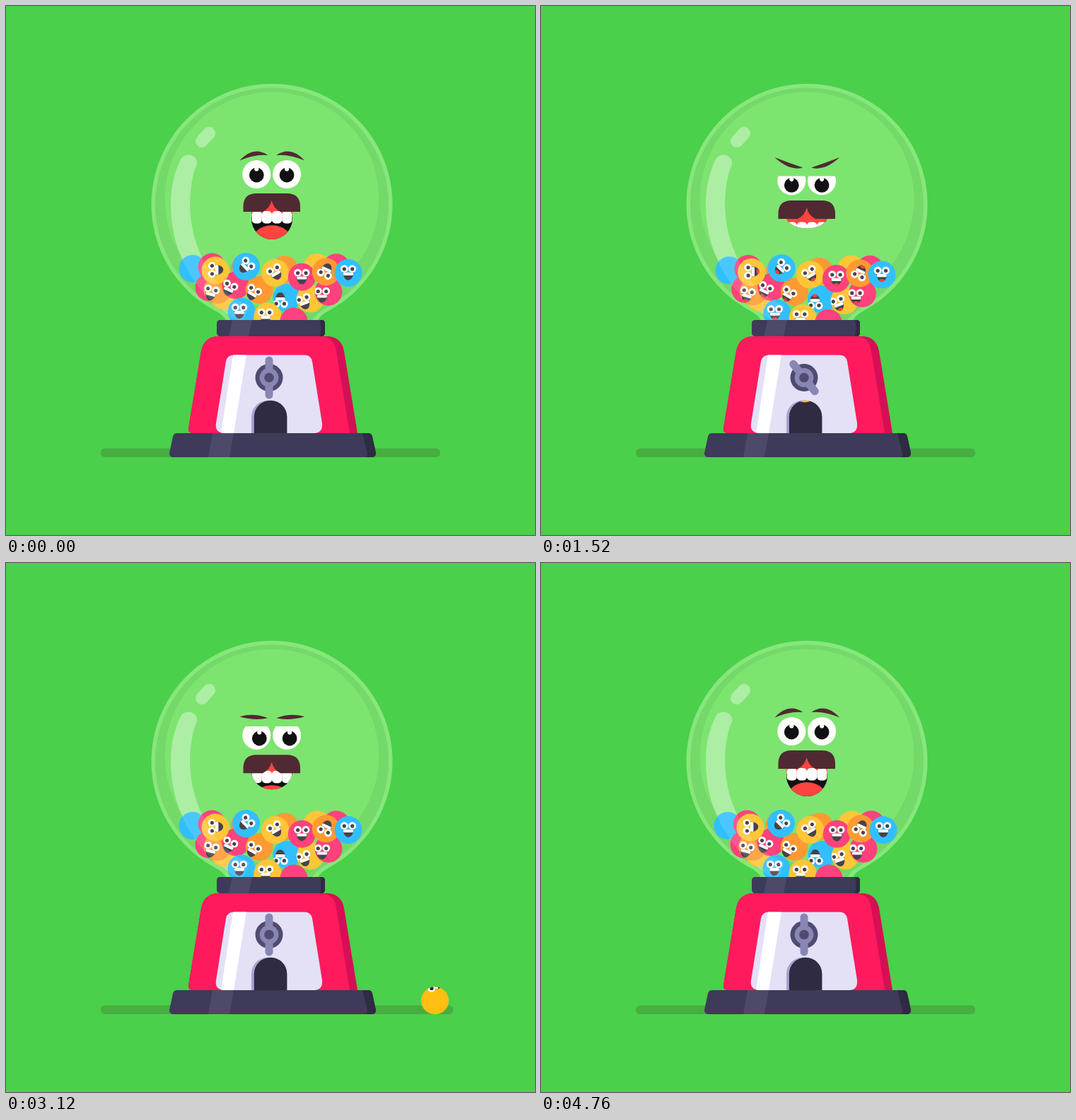
Animation, 748 px wide and 748 px high, one loop 4.8 s. Source, as an HTML page with a canvas:

```html
<!DOCTYPE html>
<html lang="en">
<head>
<meta charset="utf-8">
<title>Gumball machine</title>
<style>
  html, body { margin: 0; width: 100%; height: 100%; overflow: hidden; background: #4ad04a; }
  canvas { display: block; width: 748px; height: 748px; }
</style>
</head>
<body>
<canvas id="stage"></canvas>
<script>
const LOOP = 4800, SIZE = 748, R = 19.5, TAU = Math.PI * 2;
const canvas = document.getElementById('stage');
const c = canvas.getContext('2d');
const ratio = window.devicePixelRatio || 1;
canvas.width = canvas.height = SIZE * ratio;

const GROUND = '#47ae40', NAVY = '#3e3a59', SHADE = '#2e2b42', GLEAM = '#4d4968';
const RED = '#ff4440', HAIR = '#502a32', INK = '#111114';
const COLORS = { p: '#ff427b', o: '#ff9a32', y: '#ffc637', b: '#32bfff' };

// Rows of gumballs, back to front: each spreads from x to end and bobs along a wave.
const rows = [
  { balls: 'bpooyp', x: 264, end: 467, sway: -14, arcs: 2, y: 371, bob: 2, freq: 1.8 },
  { balls: 'py', x: 287, end: 308, y: 398, slope: 12 },
  { balls: 'opobyp', x: 299, end: 456, sway: -6, arcs: 2, y: 405, bob: 10, freq: 1.2,
    slide: [-9, 4], turns: [15, 25, 30, 180, -20, 0] },
  { balls: 'byp', x: 333, end: 407, y: 432, slope: 7, slide: [-3, -1], turns: [0, 0] },
  { balls: 'ybypob', x: 296, end: 484, sway: 10, arcs: 1, y: 372.7, slope: 1.7, bob: 6, freq: 1.8,
    slide: [0, -1], turns: [-90, 45, -30, 0, 205, 0] }
];
const balls = rows.flatMap(({ balls, x, end, sway = 0, arcs = 1, y, slope = 0, bob = 0, freq = 0, slide, turns = [] }) =>
  [...balls].map((color, n) => {
    const u = n / (balls.length - 1);
    return {
      color: COLORS[color],
      x: x + (end - x) * u + sway * Math.sin(arcs * Math.PI * u),
      y: y + slope * n - bob * Math.cos(freq * (n - 1)),
      face: n < turns.length && [...slide, turns[n]]
    };
  }));

const clamp = k => Math.min(1, Math.max(0, k));
const part = (t, a, b) => clamp((t - a) / (b - a));
const ramp = (t, a, b) => (1 - Math.cos(Math.PI * part(t, a, b))) / 2;
const bump = (t, mid, width) => Math.exp(-(((t - mid) / width) ** 2));

// How far the face sinks from its cheerful pose.
const droopKeys = [[0, 0], [840, 1], [1100, 1], [1520, 1.2], [1680, 1.2], [1860, -0.4], [2140, 0],
  [2440, 1.2], [2780, 0], [3120, 0.75], [3500, 1], [4000, 1], [4480, 0]];
const droopAt = t => droopKeys.slice(1).reduce((sum, [end, v], n) =>
  sum + (v - droopKeys[n][1]) * ramp(t, droopKeys[n][0], end), 0);

const twist = t => 57 * ramp(t, 120, 540) + 123 * ramp(t, 1060, 1800);
const squash = t => ramp(t, 140, 520) - ramp(t, 1560, 1700) - 1.5 * bump(t, 1820, 80);
const chatAt = t => ({ height: 9 + 2.3 * Math.cos(3 * TAU * t / LOOP), tongue: bump(t, 1600, 300) });

function fill(color, path) {
  c.beginPath();
  path();
  c.fillStyle = color;
  c.fill();
}
const disc = (x, y, r, color) => fill(color, () => c.arc(x, y, r, 0, TAU));
const oval = (x, y, rx, ry, color) => fill(color, () => c.ellipse(x, y, rx, ry, 0, 0, TAU));
const shape = (d, color) => { c.fillStyle = color; c.fill(new Path2D(d)); };

function layer(draw) {
  c.save();
  draw();
  c.restore();
}
function clip(path) {
  c.beginPath();
  path();
  c.clip();
}

function smallFace({ height, tongue }, dark) {
  for (const x of [-5.7, 5.7]) {
    disc(x, -5, 5.4, '#fff');
    disc(x, -4.6, 2.6, dark);
  }
  layer(() => {
    clip(() => c.ellipse(0, 0, 7.4, height, 0, 0, Math.PI));
    c.fillStyle = dark;
    c.fillRect(-8, 0, 16, 14);
    oval(0, 1 + height, 5, 5.5 * tongue, RED);
    fill('#fff', () => c.roundRect(-7, 0, 14, 4.4, 1.5));
  });
}

function gumball(x, y, color, face, chat, dark = '#48424a') {
  disc(x, y, R, color);
  if (!face) return;
  layer(() => {
    clip(() => c.arc(x, y, R, 0, TAU));
    c.translate(x + face[0], y + face[1]);
    c.rotate(face[2] * Math.PI / 180);
    smallFace(chat, dark);
  });
}

function floor(x) {
  fill(GROUND, () => {
    c.roundRect(134, 625.5, 480, 12.5, 6);
    if (x > 540) c.roundRect(x - 26, 625.5, 52, 12.5, 6);
  });
}

function shine(alpha) {
  layer(() => {
    c.globalAlpha = alpha;
    shape('M247 217 C252 207 268 209 270 220 C271 224 269 227 267 231 ' +
      'C252 282 262 340 294 384 C306 402 324 416 344 424 L336 444 H326 ' +
      'C276 414 233 358 233 280 C233 255 238 235 247 217Z', '#fff');
    c.lineCap = 'round';
    c.lineWidth = 18;
    c.strokeStyle = '#fff';
    c.beginPath();
    c.moveTo(277, 191);
    c.lineTo(287, 180);
    c.stroke();
  });
}

function globe(t) {
  shape('M312 446 Q308 437 294 430 A170.5 170.5 0 1 1 458 430 Q444 437 440 446Z', '#86e77b');
  shape('M320 446 Q314 435 298 426 A165 165 0 1 1 454 426 Q438 435 432 446Z', '#73d968');
  disc(376, 273, 151.5, '#7de470');
  shine(0.27);

  const s = squash(t);
  for (const { x, y, color, face } of balls) {
    gumball(376 + (x - 376) * (1 - 0.02 * s), y + 2.4 * s, color, face, chatAt(t));
  }
  shine(0.12);
}

function face(t) {
  const droop = droopAt(t);
  const scowl = bump(t, 1540, 200) + 0.3 * bump(t, 3120, 200);
  const lick = bump(t, 2440, 150);
  const look = 4 * (ramp(t, 2280, 2560) - ramp(t, 4080, 4440));

  const lid = 217 + 18 * droop + 2 * scowl;
  const eye = 238 + 7.7 * droop;
  const pupil = 239 + 12 * droop;
  const hair = 291 + 8.3 * droop - 6 * lick;
  const bottom = 330 - 13 * droop - 6.4 * lick;
  const teeth = 290 + 9 * droop ** 3;
  const tongue = 310 + 5.5 * droop - 38 * lick;
  const outer = 218.5 - 4.5 * scowl;
  const inner = 211 + 7.5 * droop + 8.5 * scowl;
  const bend = 197 + 18 * droop + 3.4 * scowl - 17 * lick;

  for (const side of [1, -1]) {
    layer(() => {
      c.translate(376.3, 0);
      c.scale(side, 1);
      fill(HAIR, () => {
        c.moveTo(-46, outer);
        c.quadraticCurveTo(-26, bend, -6, inner);
        c.quadraticCurveTo(-24, bend + 12, -46, outer);
      });
    });
    const x = 375.7 - side * 21.4;
    layer(() => {
      clip(() => c.rect(x - 21, lid, 42, 60));
      disc(x, eye, 20, '#fffefa');
      disc(x + look, pupil, 10.4, INK);
      disc(x + look, pupil - 8.6, 3.1, '#fffefa');
    });
  }

  const depth = Math.min(29, bottom - hair + 3);
  const mouth = () => {
    c.moveTo(347, hair - 20);
    c.lineTo(405, hair - 20);
    c.ellipse(376, bottom - depth, 29, depth, 0, 0, Math.PI);
    c.closePath();
  };
  layer(() => {
    clip(mouth);
    c.fillStyle = INK;
    c.fillRect(340, hair - 30, 72, 90);
    c.fillStyle = RED;
    c.fillRect(340, hair - 30, 72, teeth - hair + 38);
    for (let n = 0; n < 4; n++) {
      fill('#fff', () => c.roundRect(347.6 + n * 14.2, teeth, 14.2, 17.5, 5));
    }
  });

  const top = hair - 26;
  fill(HAIR, () => {
    c.moveTo(335.5, hair);
    c.lineTo(335.5, top + 18);
    c.quadraticCurveTo(336, top, 354, top);
    c.lineTo(397.5, top);
    c.quadraticCurveTo(415.5, top, 416, top + 18);
    c.lineTo(416, hair);
    c.lineTo(388, hair);
    c.quadraticCurveTo(378, hair - 5, 375.7, hair - 16);
    c.quadraticCurveTo(373, hair - 5, 363, hair);
  });
  layer(() => {
    clip(mouth);
    oval(376, tongue + 22, 28, 22, RED);
  });
}

function door(x) {
  c.moveTo(x, 604);
  c.arc(x + 23.3, 581, 23.3, Math.PI, 0);
  c.lineTo(x + 46.6, 604);
}

function machine(t) {
  shape('M264 604 Q257 604 258 597 L276 488 Q280 467 301 467 H453 Q474 467 478 488 L497 604Z', '#d60f54');
  shape('M264 604 Q257 604 258 597 L276 488 Q280 467 301 467 H446 Q464 468 467 488 L486 604Z', '#ff1a5e');

  const panel = 'M308 604 Q295 603 297 590 L311 502.5 Q313 493.5 322 493.5 H422 Q431 493.5 433 502.5 L447 590 Q448 603 437 604Z';
  shape(panel, '#e4e0f6');
  layer(() => {
    c.clip(new Path2D(panel));
    shape('M321 493 H340 L322 604 H304Z', '#fff');
  });

  fill('#a8a3d0', () => door(347));
  fill(SHADE, () => door(350.8));

  shape('M303 444 H446 Q451 444 451 449 V462 Q451 467 446 467 H303 Q298 467 298 462 V449 Q298 444 303 444Z', NAVY);
  shape('M320 444 H348 L343 467 H315Z', GLEAM);
  shape('M444 444 H446 Q451 444 451 449 V462 Q451 467 446 467 H444 Q447 456 444 444Z', SHADE);

  shape('M242 604 H512 Q517 604 518 609 L523 632 Q523 638 517 638 H237 Q231 638 231 632 L236 609 Q237 604 242 604Z', NAVY);
  shape('M292 604 H322 L316 638 H286Z', GLEAM);
  shape('M504 604 H512 Q517 604 518 609 L523 632 Q523 638 517 638 H508 Q512 637 511 632Z', SHADE);

  disc(372, 525.5, 19.5, '#4f4b70');
  disc(372, 525.5, 13.4, '#8986b4');
  layer(() => {
    c.translate(372, 525.5);
    c.rotate(twist(t) * Math.PI / 180);
    fill('#8986b4', () => c.roundRect(-5.5, -30, 11, 60, 5.5));
  });
  disc(372, 525.5, 6.8, '#4f4b70');
}

// Steady roll that slows down far from the machine.
const rollX = t => Math.max(373, 503 + 0.152 * (t - 2440) - 3.3e-5 * Math.max(0, t - 3360) ** 2);

function roller(t, x) {
  if (t < 1500 || x > 774) return;
  const y = 539 + 45.3 * part(t, 1500, 1600) ** 2 + 34.5 * part(t, 2530, 2720) ** 2;
  const slide = (0.0292 * (t - 1720) + 32) % 64 - 32;
  layer(() => {
    if (t < 1620) clip(() => door(350.8));
    gumball(x, y, '#ffbf12', [0.8 * Math.max(0, slide), slide, -90], { height: 10, tongue: 1 }, '#29252a');
  });
}

function draw(t) {
  c.setTransform(ratio, 0, 0, ratio, 0, 0);
  c.fillStyle = '#4ad04a';
  c.fillRect(0, 0, SIZE, SIZE);
  const x = rollX(t);
  floor(x);
  globe(t);
  face(t);
  machine(t);
  roller(t, x);
}

const start = performance.now();
function tick() {
  draw((performance.now() - start) % LOOP);
  requestAnimationFrame(tick);
}
tick();
</script>
</body>
</html>
```
